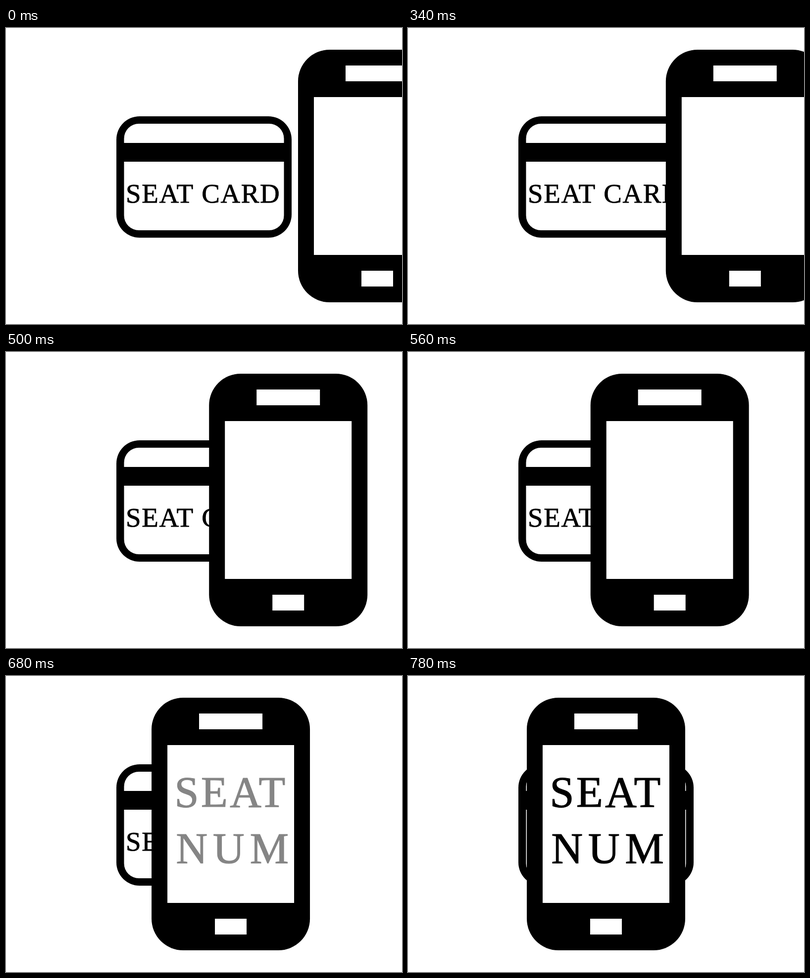
An HTML page with a canvas that plays this animation: 800 px wide and 600 px high, repeating every 1380 ms.

```html
<!DOCTYPE html>
<html lang="en">
<head>
<meta charset="utf-8">
<title>Seat card</title>
<style>
  html, body { margin: 0; width: 100%; height: 100%; overflow: hidden; background: #fff; }
  canvas { display: block; filter: blur(0.7px); }
</style>
</head>
<body>
<canvas id="stage" width="800" height="600"></canvas>
<script>
const ctx = document.getElementById('stage').getContext('2d');
const LOOP = 1380, START = 260, TICK = 20, STEPS = 27;
const FROM = 590, TO = 240, SPEED = 13.83;
const clamp = (v, lo, hi) => Math.min(hi, Math.max(lo, v));

function box(x, y, w, h, color, r = 0) {
  ctx.fillStyle = color;
  ctx.beginPath();
  ctx.roundRect(x, y, w, h, r);
  ctx.fill();
}

// a hairline stroke gives the letters a little more weight
function label(str, x, y, size, spacing, gray = 0) {
  ctx.font = `${size}px "Liberation Serif", "Times New Roman", serif`;
  ctx.letterSpacing = spacing + 'px';
  ctx.fillStyle = ctx.strokeStyle = `rgb(${gray}, ${gray}, ${gray})`;
  ctx.lineWidth = size * 0.014;
  ctx.fillText(str, x, y);
  ctx.strokeText(str, x, y);
}

function card() {
  box(223, 179, 354, 246, '#000', 47);
  box(238.5, 194, 323, 216, '#fff', 30);
  box(230, 233, 340, 38, '#000');
  label('SEAT CARD', 242, 353.5, 55, 1.6);
}

function phone(x, fade) {
  box(x, 44, 320, 512, '#000', 64);
  box(x + 96, 76, 128, 32, '#fff');
  box(x + 32, 140, 256, 320, '#fff');
  box(x + 128, 492, 64, 32, '#fff');
  if (!fade) return;
  const gray = Math.round(255 * (1 - fade));
  label('SEAT', x + 46.5, 265, 88, 4.5, gray);
  label('NUM', x + 49.5, 379, 88, 11, gray);
}

function draw(t) {
  const step = clamp(Math.floor((t - START) / TICK) + 1, 0, STEPS);
  // the slide loses about half a step as the text starts to fade in
  const moved = SPEED * (step < 18 ? step : step - 0.6);
  const x = Math.max(TO, FROM - moved);
  const fade = clamp((step - 17.4) / 9.6, 0, 1);
  box(0, 0, 800, 600, '#fff');
  card();
  phone(x, fade);
}

function loop(now) {
  draw(now % LOOP);
  requestAnimationFrame(loop);
}
draw(0);
requestAnimationFrame(loop);
</script>
</body>
</html>
```
